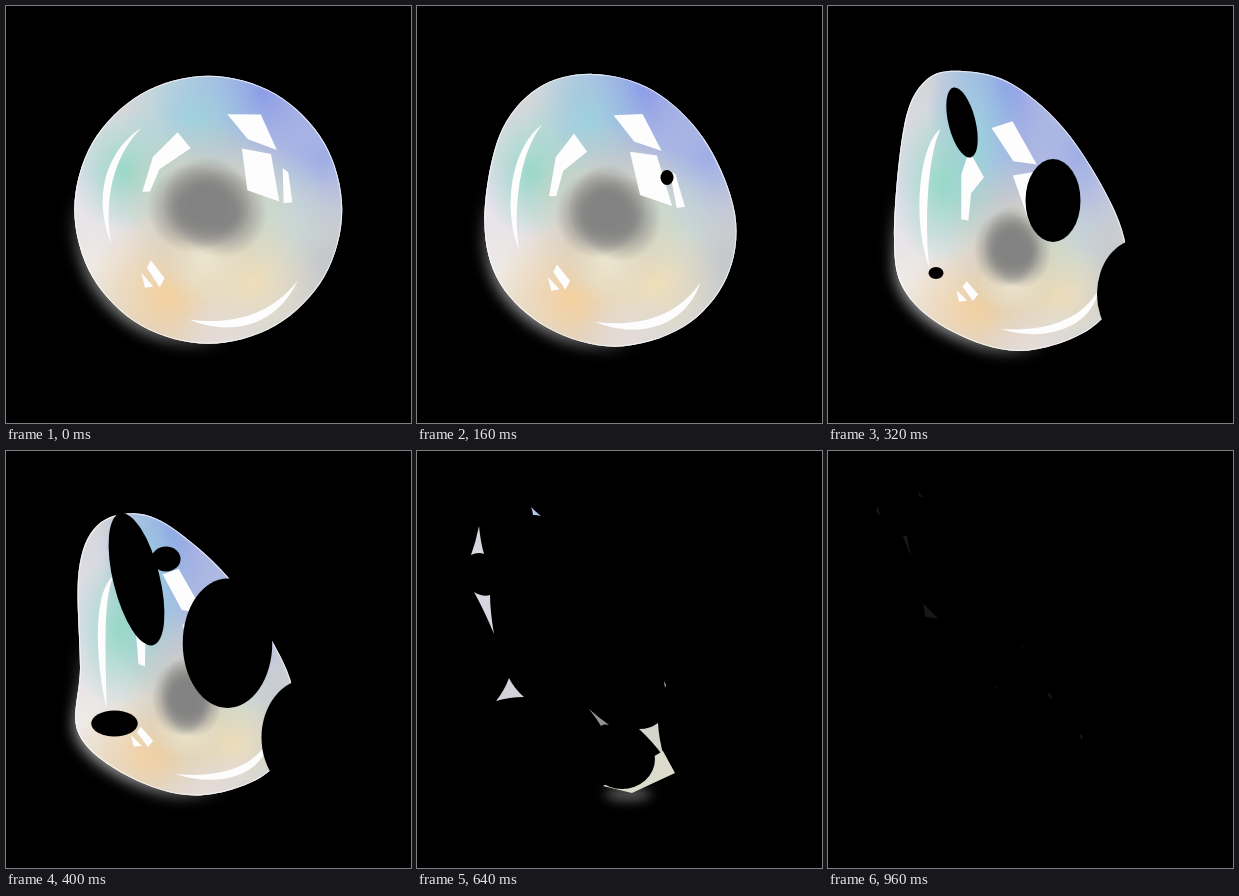
Write an HTML page with a canvas that moves like this. It is 405 px wide and 417 px high and loops after 1 s.

```html
<!DOCTYPE html>
<html lang="en">
<head>
<meta charset="utf-8">
<title>Bursting bubble</title>
<style>
html, body { margin: 0; width: 100%; height: 100%; overflow: hidden; background: #000; }
canvas { display: block; width: 405px; height: 417px; }
</style>
</head>
<body>
<canvas id="stage"></canvas>
<script>
const LOOP = 1000, STEP = 40, SPAN = 160, BURST = 640;
const CX = 202.3, CY = 203.8, R = 134, SIDES = 12;
const canvas = document.getElementById('stage');
const dpr = window.devicePixelRatio || 1;
canvas.width = 405 * dpr;
canvas.height = 417 * dpr;
const ctx = canvas.getContext('2d');

const mix = (a, b, k) => a.map((v, i) => v + (b[i] - v) * k);

function keyed(list, t) {
  const i = Math.min(Math.floor(t / SPAN), list.length - 2);
  return mix(list[i], list[i + 1], t / SPAN - i);
}

// Rim poses, clockwise from the top, one per span.
const round = Array.from({ length: SIDES }, (_, i) => {
  const a = i * 2 * Math.PI / SIDES;
  return [CX + R * Math.sin(a), CY - R * Math.cos(a)];
}).flat();
const bent = [135,65, 186,79, 242,130, 291,215, 296,275, 262,323, 192,345, 125,326, 78,287, 66,232, 76,120, 98,74];
const torn = [126,60, 157,82, 215,138, 271,224, 277,285, 252,327, 187,344, 120,325, 67,278, 82,200, 69,122, 84,75];
const last = [114,56, 140,78, 195,150, 249,234, 265,285, 258,322, 212,342, 130,330, 78,268, 77,188, 54,107, 62,75];
const POSES = [round, mix(round, bent, .4), bent, torn, last];

// Centre and falloff power of the inner shading.
const CORES = [[CX, CY, 1], [192, 210, 1.05], [186, 246, 1.22], [178, 256, 1.25], [174, 262, 1.25]];

// Birth, tilt, then cx, cy, rx, ry at each following span.
const HOLES = [
  [120, 0, [250,171.5,6.5,7.5], [225,194.5,27.5,41.5], [218,190,62,88], [212,185,64,94]],
  [200, -14, [134,116.5,13.5,36], [127,140,33,100], [127,140,55,120]],
  [200, 0, [312,288,43,55], [292,285,50,62], [290,275,50,60]],
  [280, 0, [108,267,7.5,6], [109,278,39,20], [113,285,60,40]],
  [340, 0, [160,108,34,29], [165,120,56,56]],
  [400, 0, [190,303,17,13], [205,308,33,30]],
  [430, 0, [139,321,11,6], [165,320,28,23]],
  [540, 0, [64,123,13,20]]
];

// x, y, radius, colour
const TINTS = [
  [75, 185, 95, '#ebe1f2'], [85, 260, 90, '#f0ece6'],
  [255, 85, 110, '#8697ea'], [322, 150, 80, '#9baae6'],
  [190, 112, 75, '#9bd2de'], [118, 165, 62, '#93d8c6'],
  [330, 255, 85, '#c3c6c8'], [255, 210, 75, '#c5ddd4'],
  [160, 292, 85, '#f7d09a'], [245, 275, 70, '#f2dfb6'],
  [215, 335, 50, '#e6dcd8'], [200, 200, 92, '#d8ceb6'],
  [198, 256, 44, '#ece6d0']
];

const GLINTS = [
  [171,124, 184,140, 152,162, 142,185, 134,185, 145,149],
  [222,105, 255,108, 273,142, 242,133],
  [236,142, 267,146, 275,195, 242,184],
  [277,162, 284,166, 288,196, 279,197],
  [143,256, 158,273, 153,282, 139,264],
  [133,269, 146,282, 137,284]
];

// Colour, corners at the burst and a span later, then the final centre.
const SHARDS = [
  ['#d8d5df', [62,75, 54,104, 67,103], [54,62, 51,70, 57,77], [50,60]],
  ['#d8d5df', [57,141, 73,144, 77,183], [67,174, 73,174, 79,205], [79,92]],
  ['#b6c6ea', [114,56, 124,65, 116,64], [98,47, 105,54, 100,54], [92,44]],
  ['#d3d2d8', [92,227, 107,246, 79,250], [88,222, 110,244, 91,241], [101,162]],
  ['#929292', [172,258, 192,274, 184,275], [175,252, 183,257, 179,257], [169,236]],
  ['#d2d5ca', [222,278, 241,272, 247,306], [234,261, 238,272, 230,265], [222,245]],
  ['#dcdccd', [246,300, 258,322, 215,342, 186,335], [257,304, 262,309, 260,315, 259,311], [253,286]],
  ['#c9cccc', [247,230, 249,234, 248,237], [228,222, 231,226, 230,227], [195,196]]
];

const pairs = p => Array.from({ length: p.length / 2 }, (_, i) => [p[2 * i], p[2 * i + 1]]);

function fillPoly(points) {
  ctx.beginPath();
  points.forEach(q => ctx.lineTo(...q));
  ctx.closePath();
  ctx.fill();
}

function ellipse(x, y, rx, ry, tilt = 0) {
  ctx.beginPath();
  ctx.ellipse(x, y, rx, ry, tilt * Math.PI / 180, 0, 2 * Math.PI);
  ctx.fill();
}

function smooth(p) {
  const pts = pairs(p), n = pts.length;
  const path = new Path2D();
  path.moveTo(...pts[0]);
  for (let i = 0; i < n; i++) {
    const [a, b, c, d] = [-1, 0, 1, 2].map(k => pts[(i + k + n) % n]);
    path.bezierCurveTo(
      b[0] + (c[0] - a[0]) / 6, b[1] + (c[1] - a[1]) / 6,
      c[0] - (d[0] - b[0]) / 6, c[1] - (d[1] - b[1]) / 6, ...c);
  }
  path.closePath();
  return path;
}

// Carries a point of the round bubble into the bent one.
function warper(rim, core) {
  const pts = pairs(rim), full = 2 * Math.PI;
  return (x, y) => {
    const dx = x - CX, dy = y - CY;
    const turn = (Math.atan2(dx, -dy) + full) % full / full * SIDES;
    const i = Math.floor(turn) % SIDES;
    const edge = mix(pts[i], pts[(i + 1) % SIDES], turn - Math.floor(turn));
    return mix(core.slice(0, 2), edge, Math.pow(Math.hypot(dx, dy) / R, core[2]));
  };
}

function blob(warp, x, y, r, color, solid = 0) {
  const rx = (warp(x + r, y)[0] - warp(x - r, y)[0]) / 2;
  const ry = (warp(x, y + r)[1] - warp(x, y - r)[1]) / 2;
  ctx.save();
  ctx.translate(...warp(x, y));
  ctx.scale(Math.max(rx, r / 2), Math.max(ry, r / 2));
  ctx.globalAlpha = .93;
  const g = ctx.createRadialGradient(0, 0, 0, 0, 0, 1);
  g.addColorStop(solid, color);
  g.addColorStop((1 + solid) / 2, color + '80');
  g.addColorStop(1, color + '00');
  ctx.fillStyle = g;
  ctx.fillRect(-1, -1, 2, 2);
  ctx.restore();
}

function crescent(warp, ...points) {
  const [a, b, c, d, e, f] = points.map(q => warp(...q));
  ctx.beginPath();
  ctx.moveTo(...a);
  ctx.bezierCurveTo(...b, ...c, ...d);
  ctx.bezierCurveTo(...e, ...f, ...a);
  ctx.fill();
}

function glow(path) {
  const g = ctx.createLinearGradient(100, 200, 50, 250);
  g.addColorStop(0, 'rgba(255,255,255,0)');
  g.addColorStop(1, 'rgba(255,255,255,.62)');
  ctx.save();
  ctx.filter = `blur(${7 * dpr}px)`;
  ctx.translate(2, 19);
  ctx.scale(.95, .95);
  ctx.fillStyle = g;
  ctx.fill(path);
  ctx.restore();
}

function hole([born, tilt, ...poses], t) {
  if (t <= born) return;
  const first = Math.ceil(born / SPAN) * SPAN;
  const [x, y, rx, ry] = poses[0];
  const shape = t < first
    ? mix([x, y, 0, 0], poses[0], (t - born) / (first - born))
    : poses.length > 1 ? keyed(poses, t - first) : [x, y, rx, ry];
  ctx.fillStyle = '#000';
  ellipse(...shape, tilt);
}

function bubble(t) {
  const rim = keyed(POSES, t);
  const warp = warper(rim, keyed(CORES, t));
  const path = smooth(rim);
  glow(path);
  ctx.save();
  ctx.clip(path);
  ctx.fillStyle = '#d3d7da';
  ctx.fillRect(0, 0, 405, 417);
  TINTS.forEach(v => blob(warp, ...v));
  blob(warp, 186, 202, 46, '#858585', .3);
  blob(warp, 217, 207, 46, '#858585', .3);
  blob(warp, 201, 196, 46, '#828282', .35);
  ctx.fillStyle = '#fdfdfd';
  GLINTS.forEach(g => fillPoly(pairs(g).map(q => warp(...q))));
  crescent(warp, [134, 119], [99, 145], [84, 192], [102, 238], [96, 196], [106, 150]);
  crescent(warp, [294, 277], [270, 322], [224, 334], [182, 317], [226, 323], [264, 310]);
  ctx.lineWidth = 2;
  ctx.strokeStyle = 'rgba(255,255,255,.7)';
  ctx.stroke(path);
  ctx.restore();
  HOLES.forEach(h => hole(h, t));
}

// Corners joined by sides that sag toward the middle.
function shard(points, bend) {
  const mid = [0, 1].map(c => points.reduce((s, q) => s + q[c], 0) / points.length);
  ctx.beginPath();
  ctx.moveTo(...points[0]);
  points.forEach((q, i) => {
    const next = points[(i + 1) % points.length];
    ctx.quadraticCurveTo(...mix(mix(q, next, .5), mid, bend), ...next);
  });
  ctx.fill();
}

function settle(corners, center) {
  const pts = pairs(corners);
  const mid = [0, 1].map(c => pts.reduce((s, q) => s + q[c], 0) / pts.length);
  return pts.flatMap(q => q.map((v, c) => center[c] + (v - mid[c]) * .7));
}

function burst(u) {
  ctx.save();
  ctx.globalAlpha = Math.max(0, 1 - u / 120) * .4;
  ctx.filter = `blur(${6 * dpr}px)`;
  ctx.fillStyle = '#fff';
  ellipse(211, 343, 23, 6);
  ctx.restore();
  ctx.globalAlpha = 1 - u / (LOOP - BURST);
  for (const [color, a, b, center] of SHARDS) {
    const points = pairs(keyed([a, b, settle(b, center)], u));
    ctx.fillStyle = color;
    shard(points, points.length > 3 ? 0 : Math.max(0, .3 * (1 - u / SPAN)));
  }
  ctx.globalAlpha = 1;
  if (u < SPAN / 2) {
    ctx.fillStyle = '#000';
    ellipse(205, 308, 33, 30);
  }
}

const start = performance.now();
function draw(now) {
  const t = Math.floor(Math.max(0, now - start) % LOOP / STEP) * STEP;
  ctx.setTransform(dpr, 0, 0, dpr, 0, 0);
  ctx.fillStyle = '#000';
  ctx.fillRect(0, 0, 405, 417);
  if (t < BURST) bubble(t);
  else burst(t - BURST);
  requestAnimationFrame(draw);
}
draw(start);
</script>
</body>
</html>
```
